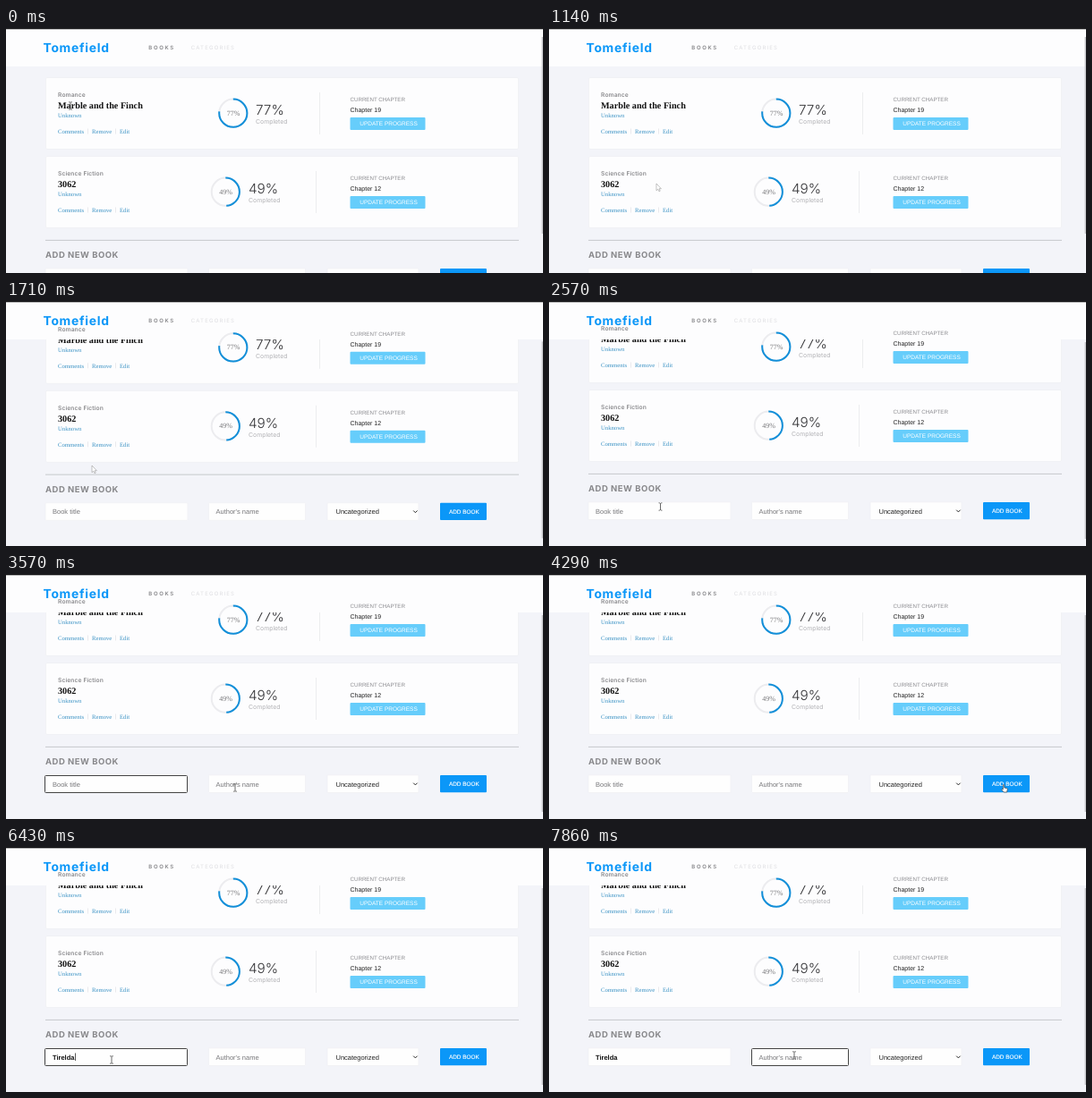
An HTML page that plays this animation: 600 by 274 pixels, repeating every 8 s.

```html
<!DOCTYPE html>
<html lang="en">
<head>
<meta charset="utf-8">
<title>Book list</title>
<style>
  html, body { margin: 0; width: 100%; height: 100%; overflow: hidden; background: #f3f4f9; }
  svg { display: block; width: 100%; height: 100%; }
  text { white-space: pre; text-rendering: geometricPrecision; }
  .head { font-family: Inter, sans-serif; }
  .serif { font-family: "Liberation Serif", "Times New Roman", serif; }
  .sans { font-family: "Liberation Sans", Arial, sans-serif; }
</style>
</head>
<body>
<svg id="stage" viewBox="0 0 600 274" xmlns="http://www.w3.org/2000/svg"></svg>
<script>
const LOOP = 8000, FPS = 7, SCROLL = 44;
const BLUE = '#0b97f8', LINK = '#3a92c4';

const text = (font, x, y, size, fill, str, extra = '') =>
  `<text class="${font}" x="${x}" y="${y}" font-size="${size}" fill="${fill}" ${extra}>${str}</text>`;
const rect = (x, y, w, h, fill, extra = '') =>
  `<rect x="${x}" y="${y}" width="${w}" height="${h}" fill="${fill}" ${extra}/>`;
const bold = 'font-weight="700"';
const middle = 'text-anchor="middle"';

const cards = [
  { y: 0, genre: 'Romance', title: 'Marble and the Finch', percent: 77, chapter: 19, ring: 253.8, stat: 279, rule: 350 },
  { y: 88, genre: 'Science Fiction', title: '3062', percent: 49, chapter: 12, ring: 245.3, stat: 271, rule: 346 }
];

// Parts of a card that slide beneath the fixed header
function cardBase(c) {
  return `<g transform="translate(0 ${c.y})">` +
    rect(44.5, 55.5, 528, 80, '#fdfdfe', 'rx="1.5" stroke="#eff0f4" stroke-width=".8"') +
    text('serif', 58, 89.8, 10.2, '#111', c.title, bold) +
    text('serif', 58, 100, 6.7, LINK, 'Unknown') +
    text('serif', 58, 118, 6.7, LINK, 'Comments') +
    text('serif', 96, 118, 6.7, LINK, 'Remove') +
    text('serif', 127, 118, 6.7, LINK, 'Edit') +
    rect(91, 112.5, .6, 6, '#dcdde2') + rect(122, 112.5, .6, 6, '#dcdde2') +
    text('head', c.stat, 96.8, 15.3, '#333336', c.percent + '%', 'font-weight="300"') +
    rect(c.rule, 72, .9, 47, '#eaebee') +
    text('sans', 384.5, 94.3, 7, '#222', 'Chapter ' + c.chapter) +
    rect(384.5, 100, 84, 14, '#66cdfb', 'rx="1"') +
    text('sans', 427.5, 109.4, 6.5, '#fff', 'UPDATE PROGRESS', middle) +
    '</g>';
}

// Translucent parts are stacked above the header
function cardFloat(c) {
  const ring = `cx="${c.ring}" cy="95.2" r="15.6" fill="none" stroke-width="2"`;
  return `<g transform="translate(0 ${c.y})">` +
    text('head', 58, 76.8, 6.7, '#8a8a8d', c.genre, 'font-weight="600" letter-spacing=".1"') +
    `<circle ${ring} stroke="#ececef"/>` +
    `<circle ${ring} stroke="#128fd9" pathLength="100" stroke-dasharray="${c.percent} 100" transform="rotate(-90 ${c.ring} 95.2)"/>` +
    text('serif', c.ring + .4, 97.7, 8, '#77777a', c.percent + '%', middle) +
    text('head', c.stat, 107, 6.9, '#b3b3b6', 'Completed') +
    text('sans', 384.5, 82.2, 6.2, '#8c8c90', 'CURRENT CHAPTER') +
    '</g>';
}

const box = (x, w) => rect(x, 269, w, 19.5, '#fefefe', 'stroke="#f0f0f4" stroke-width=".7" rx=".5"');
const form =
  rect(44, 236.9, 529, .9, '#c3c4c8') +
  text('head', 44, 256.9, 9.5, '#88888b', 'ADD NEW BOOK', bold + ' letter-spacing=".5"') +
  box(44, 159) + box(226.5, 108) + box(359, 102) +
  text('sans', 52, 281.6, 7.5, '#77777a', 'Book title', 'id="hint"') +
  text('sans', 52, 281.6, 7.5, '#111', 'Tirelda', bold + ' id="typed"') +
  text('sans', 234.5, 281.6, 7.5, '#77777a', "Author's name") +
  text('sans', 368.5, 281.6, 7.5, '#222', 'Uncategorized') +
  '<path d="M455.2 277.7l2.2 2.2 2.2-2.2" fill="none" stroke="#222" stroke-width="1"/>' +
  rect(485, 269, 52, 19.3, BLUE, 'rx="1"') +
  text('sans', 511.8, 281, 6.4, '#fff', 'ADD BOOK', middle + ' stroke="#fff" stroke-width=".15"') +
  rect(0, 269.5, 0, 19, 'none', 'id="focus" rx="1" stroke="#444"') +
  rect(0, 274.5, .7, 8.5, '#111', 'id="caret"');

const header =
  rect(0, 0, 600, 43, '#fdfdfe') + rect(0, 0, 600, 1.3, '#141416') +
  text('head', 41.5, 27.1, 13.9, BLUE, 'Tomefield', bold + ' letter-spacing=".7"') +
  text('head', 159.3, 24.4, 6, '#858588', 'BOOKS', 'font-weight="600" letter-spacing="1.65"') +
  text('head', 206.8, 24.4, 6, '#dedee1', 'CATEGORIES', 'letter-spacing="1.2"');

const pointers =
  '<path id="beam" d="M-1.9-4.2Q-.3-4.2 0-3.5Q.3-4.2 1.9-4.2M0-3.5V3.5M-1.9 4.2Q-.3 4.2 0 3.5Q.3 4.2 1.9 4.2" fill="none" stroke="#444" stroke-width=".8"/>' +
  '<path id="arrow" d="M0 0V7.8L1.8 6.2L3 8.8L4.2 8.2L3.1 5.7H5.4Z" fill="#fff" stroke="#999" stroke-width=".6"/>' +
  '<path id="hand" d="M-.7 4V-.2Q0-1 .7-.2V3L3.6 3.7Q4.4 4 4.2 5L3.6 8H.1L-2.2 5.2Q-2 4-.7 5Z" fill="#fff" stroke="#444" stroke-width=".7"/>';

const $ = id => document.getElementById(id);
$('stage').innerHTML =
  rect(0, 0, 600, 274, '#f3f4f9') +
  `<g id="under">${cards.map(cardBase).join('')}${form}</g>` + header +
  `<g id="over">${cards.map(cardFloat).join('')}</g>` +
  rect(598.6, 10, 1.4, 220, '#c2c3c7', 'id="thumb"') +
  `<g id="pointer">${pointers}</g>`;

// time, x, y, pointer shape from that time on
const path = [
  [0, 72, 87, 'beam'], [143, 100, 96, 'arrow'], [430, 265, 108, 'arrow'],
  [640, 446, 112, 'arrow'], [860, 330, 165, 'arrow'], [1140, 120, 174, 'arrow'],
  [1290, 96, 184, 'arrow'], [1860, 96, 184, 'arrow'], [2200, 124.5, 230, 'beam'],
  [3000, 124.5, 230, 'beam'], [3560, 256, 239, 'beam'], [3715, 256, 239, 'beam'],
  [4000, 410, 236, 'arrow'], [4280, 508, 236, 'hand'], [4570, 508, 236, 'hand'],
  [4710, 400, 239, 'arrow'], [4990, 172, 242.5, 'beam'], [5140, 172, 242.5, 'beam'],
  [5570, 118, 238, 'beam'], [6570, 118, 238, 'beam'], [7140, 274, 233, 'beam'],
  [LOOP, 274, 233, 'beam']
];

const TITLE = { x: 43.5, w: 159, text: 52 }, AUTHOR = { x: 226.5, w: 108, text: 234 };
const focusSpans = [
  [2714, 3700, TITLE], [3700, 4140, AUTHOR], [5357, 7357, TITLE], [7357, LOOP, AUTHOR]
];
const TYPED_AT = 6420;

const smooth = u => { u = Math.min(1, Math.max(0, u)); return u * u * (3 - 2 * u); };
const show = (id, on) => $(id).setAttribute('visibility', on ? 'visible' : 'hidden');
const shift = (id, x, y) => $(id).setAttribute('transform', `translate(${x} ${y})`);

function drawPointer(t) {
  const i = path.findIndex(p => p[0] > t), a = path[i - 1], b = path[i];
  const u = smooth((t - a[0]) / (b[0] - a[0]));
  shift('pointer', a[1] + (b[1] - a[1]) * u, a[2] + (b[2] - a[2]) * u);
  for (const id of ['beam', 'arrow', 'hand']) show(id, id === a[3]);
}

function drawFocus(t) {
  const typed = t >= TYPED_AT;
  show('typed', typed);
  show('hint', !typed);
  const span = focusSpans.find(s => t >= s[0] && t < s[1]);
  show('focus', span);
  show('caret', span && (t - span[0]) % 1000 < 500);
  if (!span) return;
  const field = span[2];
  $('focus').setAttribute('x', field.x);
  $('focus').setAttribute('width', field.w);
  $('caret').setAttribute('x', field === TITLE && typed ? 77 : field.text);
}

function draw(now) {
  const t = Math.floor((now % LOOP + 4) * FPS / 1000) * 1000 / FPS % LOOP;
  const scroll = smooth((t - 1143) / 620);
  shift('under', 0, -SCROLL * scroll);
  shift('over', 0, -SCROLL * scroll);
  shift('thumb', 0, 36 * scroll);
  drawPointer(t);
  drawFocus(t);
}

const start = performance.now();
function tick() {
  draw(performance.now() - start);
  requestAnimationFrame(tick);
}
tick();
</script>
</body>
</html>
```
